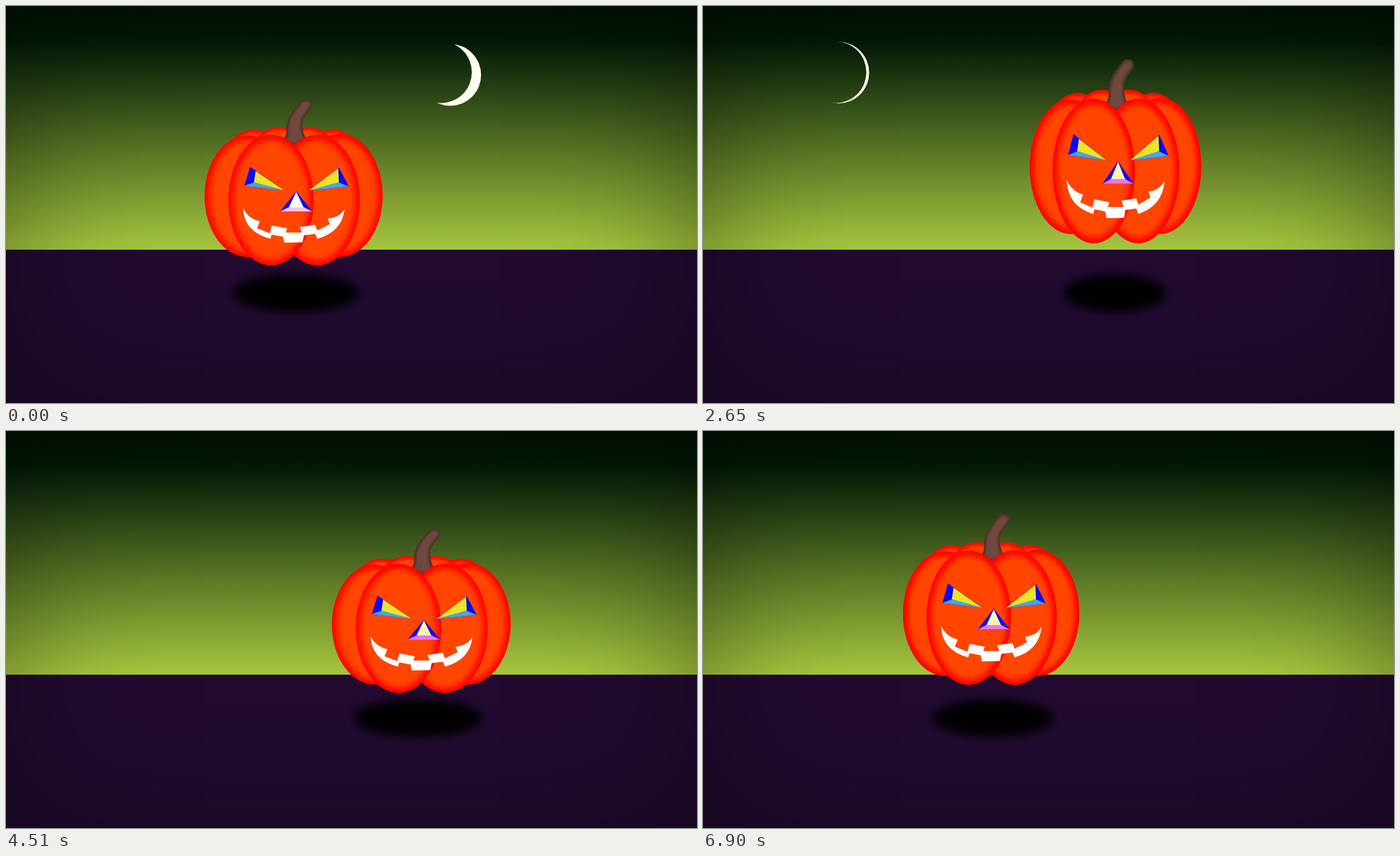
These frames come from a looping animation (988 px wide and 567 px high, 6.97 s). An HTML page:

```html
<!DOCTYPE html>
<html lang="en">
<head>
<meta charset="utf-8">
<title>Bouncing pumpkin</title>
<style>
html, body { margin: 0; width: 100%; height: 100%; overflow: hidden; background: #21092f; }
svg {
  display: block; width: 100vw; height: 100vh;
  background: linear-gradient(#021305 0, #031c08 50px, #a6c63f 348px, #220a31 348px);
  box-shadow: inset 0 0 200px rgba(0, 0, 0, .42);
}
</style>
</head>
<body>
<svg viewBox="0 0 988 567">
  <defs>
    <filter id="glow" x="-20%" y="-20%" width="140%" height="140%"><feGaussianBlur stdDeviation="4"/></filter>
    <filter id="soft" x="-20%" y="-60%" width="140%" height="220%"><feGaussianBlur stdDeviation="7"/></filter>
    <filter id="bark" x="-50%" y="-50%" width="200%" height="200%"><feGaussianBlur stdDeviation="1.6"/></filter>
    <clipPath id="lobeClip"><ellipse rx="61" ry="93.5"/></clipPath>
    <g id="lobe" clip-path="url(#lobeClip)">
      <ellipse rx="61" ry="93.5" fill="#ff4500"/>
      <ellipse rx="61" ry="93.5" fill="none" stroke="#f00" stroke-width="14" filter="url(#glow)"/>
    </g>
    <path id="stemShape" d="M396 190Q402 185 401 174C401 158 412 146 423 134Q429 130 436 134Q440 139 437 144C430 153 424 160 424 166Q423 180 430 190L412 200Z"/>
    <clipPath id="stemClip"><use href="#stemShape"/></clipPath>
    <mask id="crescent" maskUnits="userSpaceOnUse" x="-200" y="0" width="1188" height="300">
      <rect x="-200" width="1188" height="300" fill="#fff"/>
      <circle id="bite" r="44"/>
    </mask>
  </defs>

  <g mask="url(#crescent)"><circle id="moon" r="44" fill="#fffff0"/></g>
  <ellipse id="shade" cy="410" ry="27" filter="url(#soft)"/>

  <g id="pumpkin">
    <use href="#lobe" transform="translate(355 232) scale(.77 .6)"/>
    <use href="#lobe" transform="translate(467 232) scale(.77 .6)"/>
    <use href="#lobe" transform="translate(391 228) scale(.77 .6)"/>
    <use href="#lobe" transform="translate(432 228) scale(.77 .6)"/>
    <use href="#lobe" transform="translate(345 271) scale(1 .93)"/>
    <use href="#lobe" transform="translate(477.500 270) scale(1 .94)"/>
    <g clip-path="url(#stemClip)">
      <use href="#stemShape" fill="#6f493e"/>
      <use href="#stemShape" fill="none" stroke="#4a3029" stroke-width="6" filter="url(#bark)"/>
    </g>
    <use href="#lobe" transform="translate(445 276.500)"/>
    <use href="#lobe" transform="translate(379 276.500)"/>

    <path fill="#0808fa" d="M349 229L341 256L398 263ZM476 230L490 257L433 263ZM415 264L392 293H438Z"/>
    <path fill="#45a5f5" d="M341 256L355 251L398 263ZM490 257L475 251L433 263Z"/>
    <path fill="#e8e626" d="M357 235L354.500 251L398 263ZM475 231L476 251L433 263Z"/>
    <path id="noseIn" d="M415 265L404 288H426Z"/>
    <path id="noseBase" d="M392 293L404 287H426L438 293Z"/>
    <path fill="#fff" d="M339 288Q346 303 363 307L359 317L377 324L380 313L402 317L400 323H423L420 315L442 312L445 320L463 311L460 303Q477 302 484 289
      Q481 322 445 332L442 325L426 327L424 337L398 337.500L396 329L380 326L378 332Q340 322 339 288Z"/>
  </g>
</svg>
<script>
const LOOP = 6970, HALF = 746, MID = 3412;
const el = id => document.getElementById(id);
const set = (node, attrs) => { for (const k in attrs) node.setAttribute(k, attrs[k]); };
const [moon, bite, shade, pumpkin, noseIn, noseBase] =
  ['moon', 'bite', 'shade', 'pumpkin', 'noseIn', 'noseBase'].map(el);

// Sideways stops, one per half bounce, mirrored around MID
const stops = [10.4, 94.5, 94.5, -80, -80, -80, -80];

function draw(t) {
  const d = Math.abs(t - MID) / HALF, i = Math.floor(d);
  const x = stops[i] + (stops[i + 1] - stops[i]) * (d - i);
  const squash = .965 - .921 * (1 - Math.abs(d % 2 - 1));
  const sx = 1 + .1 * squash, sy = 1 - .254 * squash;

  set(pumpkin, { transform: `translate(${494 + x * sx} ${334 + 84 * squash}) scale(${sx / 1.0432} ${sy / .89}) translate(-410.5 -370.3)` });
  set(shade, { cx: 494.5 + x, rx: 71 + 44 * squash });

  const mx = 635.5 - .1667 * t, my = 98.5 - .00124 * t;
  set(moon, { cx: mx, cy: my });
  set(bite, { cx: mx - 13.3 + .0035 * t, cy: 94.7 });

  const flash = t < 66;
  set(noseIn, { fill: flash ? '#fff' : '#f8f4b0' });
  set(noseBase, { fill: flash ? '#f6c4ee' : '#ee74f0' });
}

const start = performance.now();
function tick() {
  draw((performance.now() - start) % LOOP);
  requestAnimationFrame(tick);
}
tick();
</script>
</body>
</html>
```
